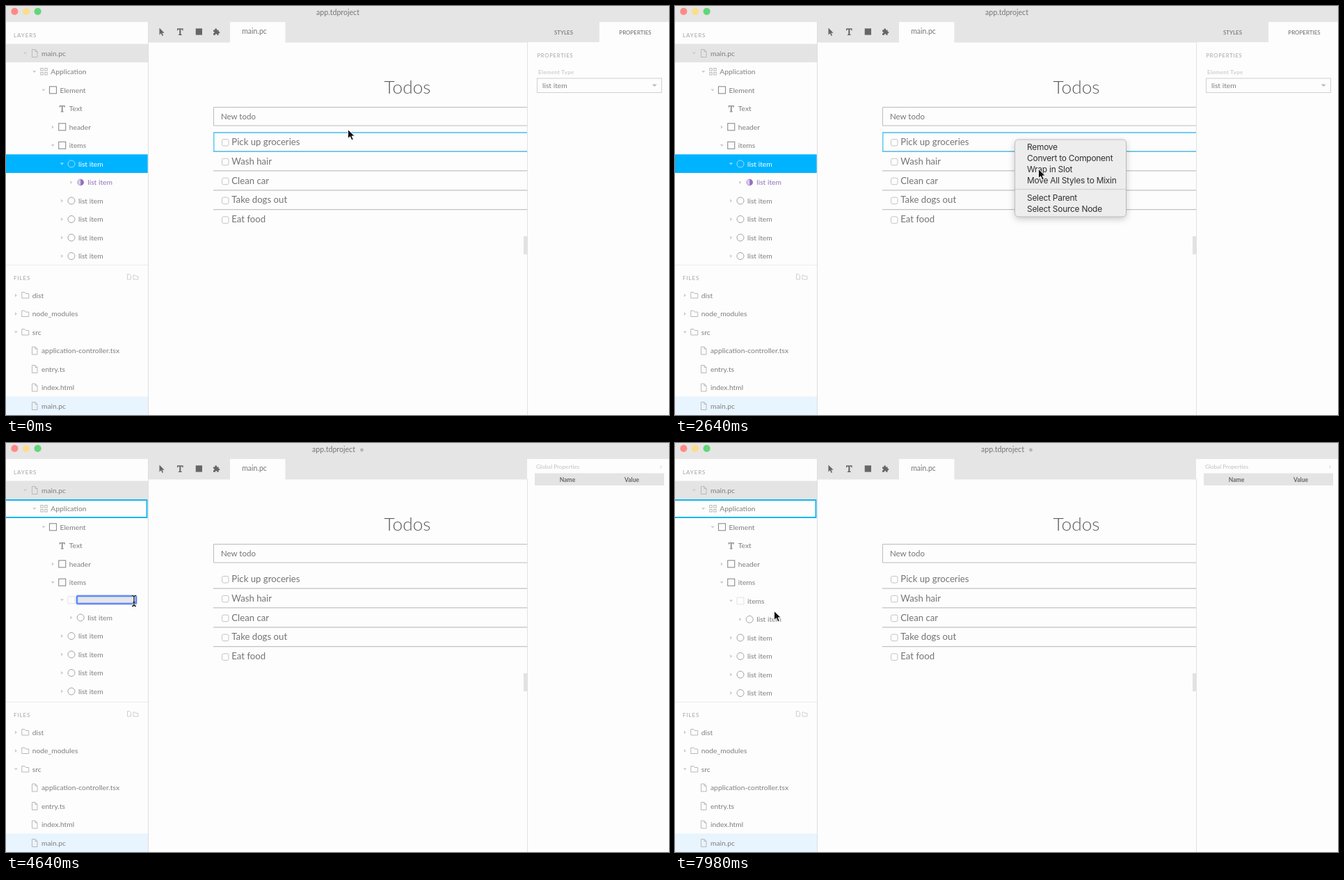
Write an HTML page that moves like this. It is 953 by 588 pixels and loops after 8000 ms.

```html
<!DOCTYPE html>
<html lang="en">
<head>
<meta charset="utf-8">
<title>app.tdproject</title>
<style>
html, body { margin: 0; height: 100%; overflow: hidden; background: #fdfdfd; }
svg { display: block; width: 953px; height: 588px; font-family: Lato, sans-serif; }
.sys { font-family: Inter, sans-serif; letter-spacing: -.22px; }
</style>
</head>
<body>
<svg id="app" viewBox="0 0 953 588"></svg>
<script>
const BLUE = '#00b3ff', TEXT = '#7f7f7f', ICON = '#a4a4a4', PALE = '#cdcdcd', PURPLE = '#9270bd';
const LOOP = 8000;

// [time, x, y]: pointer tip, held until the next entry
const pointer = [
  [0, 491, 177], [720, 487, 190], [900, 485, 194], [1610, 504, 206], [1730, 522, 219],
  [1840, 524, 234], [2080, 524, 235], [2640, 522, 234], [2760, 480, 226], [2880, 380, 217],
  [3000, 291, 211], [3390, 175, 223], [3540, 145, 225], [3660, 126, 227], [3780, 119, 227],
  [4130, 121, 227], [4280, 158, 227], [4400, 184, 227], [7620, 184, 226], [7860, 160, 236], [7980, 142, 241]
];
// [time, highlighted item, opacity]
const menuSteps = [[0, -1, 0], [1370, -1, 1], [1730, 0, 1], [1840, 2, 1], [2640, -1, 1], [2760, 2, .5], [2880, -1, 0]];
const tipSteps = [[0, 0], [5960, .5], [6070, 1], [7030, .6], [7150, .2], [7270, 0]];
const caretSteps = [[0, 0], [4130, 1], [4640, 0], [5120, 1], [5600, 0], [6070, 1], [6670, 0], [7150, 1]];
const typedSteps = [[0, ''], [7030, 'i'], [7150, 'it'], [7270, 'ite'], [7390, 'items']];

const at = (steps, t) => steps.findLast(s => s[0] <= t);
const rect = (x, y, w, h, fill, more = '') => `<rect x="${x}" y="${y}" width="${w}" height="${h}" fill="${fill}" ${more}/>`;
const box = (x, y, w, h, stroke, more = '') => rect(x, y, w, h, 'none', `stroke="${stroke}" ${more}`);
const circle = (x, y, r, more) => `<circle cx="${x}" cy="${y}" r="${r}" ${more}/>`;
const path = (d, fill, more = '') => `<path d="${d}" fill="${fill}" ${more}/>`;
const line = (d, stroke, more = '') => path(d, 'none', `stroke="${stroke}" ${more}`);
const text = (x, y, s, size, fill = TEXT, more = '') =>
  `<text x="${x}" y="${y}" font-size="${size}" fill="${fill}" ${more}>${s}</text>`;
const middle = 'text-anchor="middle"';

const icons = {
  file: (x, y) => line(`M${x - 3.5} ${y - 5.5}h4.5l3 3v8h-7.5zM${x + 1} ${y - 5.5}v3h3`, '#b8b8b8'),
  folder: (x, y) => line(`M${x - 5} ${y - 4.5}h4l1.5 2h4.5v6.5h-10z`, '#b8b8b8'),
  grid: (x, y) => [-5, 1].map(a => [-5, 1].map(b => box(x + a + .5, y + b, 3.5, 3.5, '#bbb')).join('')).join(''),
  square: (x, y) => box(x - 5, y - 5.2, 10, 10, '#8c8c8c', 'stroke-width="1.1"'),
  slot: (x, y) => box(x - 5, y - 5, 10, 10, '#d6d6d6', 'stroke-dasharray="1.5 .7"'),
  letter: (x, y) => path(`M${x - 4} ${y - 4.5}h8v2.7h-1l-.6-1.4h-1.5v7l1.2.3v.9h-4.2v-.9l1.2-.3v-7h-1.5l-.6 1.4h-1z`, '#909090'),
  circle: (x, y, c) => circle(x, y, 5, `fill="none" stroke="${c}"`),
  half: (x, y) => circle(x, y, 4.4, `fill="#ddd0ec" stroke="${PURPLE}" stroke-width=".7"`) + path(`M${x} ${y - 4.4}a4.4 4.4 0 0 1 0 8.8z`, PURPLE)
};

function fold(x, y, open, color) {
  return path(open ? `M${x - 2.6} ${y - 1.4}h5.2l-2.6 3z` : `M${x - 1.3} ${y - 2.6}v5.2l3 -2.6z`, color);
}

// fold state: 1 open, 0 closed, -1 none
function row(depth, y, icon, label, open, color = TEXT, mark = ICON) {
  const x = 51 + depth * 13.25;
  return (open < 0 ? '' : fold(x - 23.5, y, open, mark === ICON ? PALE : mark)) +
    icons[icon](x - 10, y, mark) + text(x, y + 3.7, label, 10.3, color);
}

const rowY = i => 68 + i * 26.5;
const item = (y, depth = 4) => row(depth, y, 'circle', 'list item', 0);

function chrome(t) {
  const dirty = t >= 3150, global = t >= 4010;
  let s = rect(0, 0, 953, 23, '#e5e5e5') + rect(204, 23, 749, 29.5, '#e5e5e5') + rect(322, 23, 79.5, 30, '#fdfdfd');
  ['#ff8a85', '#fbdd8c', '#62d679'].forEach((c, i) => s += circle(12.4 + i * 16.6, 7.8, 5.1, `fill="${c}"`));
  s += text(dirty ? 471 : 477, 13, 'app.tdproject', 10.6, '#777', middle);
  if (dirty) s += circle(511.5, 10, 2.4, 'fill="#b5b5b5"');
  s += path('M220.5 31.5v10l2.4-2.2 1.7 3.7 1.5-.7-1.7-3.6h3.3z', '#666');
  s += path('M246 32.3h8.6v3h-1l-.6-1.6h-1.7v6.9l1.4.3v1h-4.8v-1l1.4-.3v-6.9h-1.7l-.6 1.6h-1z', '#666');
  s += rect(272.7, 32.3, 9.3, 9.3, '#666');
  s += path('M298 34.5h2.4c-1-2.9 3.6-2.9 2.6 0h2.6v2.4c2.4-.8 2.4 3 0 2.3v2.6h-2.4c.6-2.3-2.8-2.3-2.2 0h-3v-2.6c2.2.6 2.2-2.9 0-2.3z', '#666');
  s += text(357, 40, 'main.pc', 10.5, '#777', middle);

  s += rect(749, 52, 204, 536, '#fdfdfd');
  if (global) {
    s += rect(749, 23, 204, 40, '#fdfdfd') + text(762, 37.2, 'Global Properties', 8.2, '#c0c0c0');
    s += line('M940.5 32.5l2 2 -2 2', '#ccc') + rect(760, 43.5, 186, 17.5, '#e4e4e4');
    s += text(807, 55.6, 'Name', 8.5, '#666', middle + ' font-weight="bold"') +
      text(899.5, 55.6, 'Value', 8.5, '#666', middle + ' font-weight="bold"');
  } else {
    s += rect(853, 23, 100, 30, '#fdfdfd');
    s += text(801.5, 40.7, 'STYLES', 8, '#666', middle) + text(904.5, 40.7, 'PROPERTIES', 8, '#666', middle);
  }
  if (!dirty) {
    s += text(763.5, 73.8, 'PROPERTIES', 7.6, ICON, 'letter-spacing=".8"');
    s += text(765, 98, 'Element Type', 8.1, '#c0c0c0', 'letter-spacing=".3"');
    s += box(763.5, 104, 179, 20.5, '#d0d0d0') + text(771, 117.8, 'list item', 10.3);
    s += path('M928.7 112.5h7l-3.5 3.6z', '#bbb');
  }
  return s + line('M749.5 52V588', '#e1e1e1') + rect(744, 331, 5.5, 26, '#e2e2e2');
}

function stage(t) {
  let s = text(577, 126, 'Todos', 26.3, '#5c5c5c', middle + ' font-weight="300"');
  s += line('M749 145.5H298.5V172H749', '#bcbcbc') + text(309, 163.2, 'New todo', 11.5, '#747474');
  ['Pick up groceries', 'Wash hair', 'Clean car', 'Take dogs out', 'Eat food'].forEach((label, i) => {
    const y = 195.5 + i * 27.85;
    s += box(310.5, y - 4, 9.5, 9.5, '#c4c4c4', 'rx="2.2"') + text(324.3, y + 4.3, label, 13.2, '#747474');
    if (i < 4) s += line(`M298 ${y + 13.6}H749`, '#c2c2c2', 'stroke-width="1.3"');
  });
  return s + (t < 4010 ? line('M749 182H298.8V209.2H749', '#45bfee', 'stroke-width="1.3"') : '');
}

function layers(t) {
  const wrapped = t >= 3150, open = t >= 4010, editing = t >= 4130 && t < 7620;
  let s = rect(0, 23, 204, 349, '#fdfdfd') + rect(0, 54.5, 204, 26.5, '#e4e4e4');
  s += text(11, 45.3, 'LAYERS', 8, ICON, 'letter-spacing=".9"');
  s += row(0, 68, 'file', 'main.pc', 1) + row(1, rowY(1), 'grid', 'Application', 1) + row(2, rowY(2), 'square', 'Element', 1);
  s += row(3, rowY(3), 'letter', 'Text', -1) + row(3, rowY(4), 'square', 'header', 0) + row(3, rowY(5), 'square', 'items', 1);
  if (wrapped) s += box(-1, 82, 203.5, 25, '#16b5f3', 'stroke-width="2"');

  if (!wrapped) {
    s += rect(0, 213.3, 203.7, 26.7, BLUE) + row(4, rowY(6), 'circle', 'list item', 1, '#fff', '#9fdfff');
    s += row(5, rowY(7), 'half', 'list item', 0, PURPLE);
    for (let i = 8; i < 12; i++) s += item(rowY(i));
  } else if (!open) {
    s += row(4, rowY(6), 'slot', 'Layer', 0);
    for (let i = 7; i < 11; i++) s += item(rowY(i));
    s += row(3, rowY(11), 'square', 'footer', 0);
  } else {
    const lift = editing ? 2.5 : 0;
    s += row(4, rowY(6) - lift / 2, 'slot', editing ? '' : t < 4130 ? 'Layer' : 'items', 1);
    s += item(rowY(7) - lift, 5);
    for (let i = 8; i < 12; i++) s += item(rowY(i) - lift);
    if (editing) s += field(t);
  }
  return s;
}

function field(t) {
  const typed = at(typedSteps, t)[1];
  return rect(102, 220, 85, 11, '#e6e6ea', 'stroke="#a9c0fb" stroke-width="3.4" rx="1.5"') +
    box(102, 220, 85, 11, '#4f7df0', 'stroke-width="1.6" rx="1"') +
    text(103.5, 229, typed, 10, '#555') +
    (at(caretSteps, t)[1] ? rect(103 + [0, 2.4, 6, 11.4, 0, 24][typed.length], 220.5, 1, 10.5, '#444') : '');
}

function files() {
  let s = rect(0, 372, 204, 216, '#fdfdfd') + line('M0 372.5H204', '#ebebeb') + rect(0, 561.5, 204, 27, '#e8f4fe');
  s += text(11, 393.8, 'FILES', 8, ICON, 'letter-spacing=".9"');
  s += line('M174.5 385.5h3l2 2v5.5h-5zM183 387h2.5l1 1.5h3.5v4.5h-7z', '#cfcfcf');
  const names = ['dist', 'node_modules', 'src', 'application-controller.tsx', 'entry.ts', 'index.html', 'main.pc'];
  names.forEach((name, i) => {
    const dir = i < 3;
    s += row(dir ? -1 : 0, 416 + i * 26.5, dir ? 'folder' : 'file', name, dir ? +(i === 2) : -1);
  });
  return s + line('M204.5 23V588', '#dedede');
}

function menu(t) {
  const [, active, opacity] = at(menuSteps, t);
  if (!opacity) return '';
  let s = rect(488.5, 192, 160, 111, '#ededed', 'rx="5" stroke="#bcbcbc" style="filter:drop-shadow(0 3px 5px #0003)"');
  const labels = ['Remove', 'Convert to Component', 'Wrap in Slot', 'Move All Styles to Mixin', 'Select Parent', 'Select Source Node'];
  labels.forEach((label, i) => {
    const y = 203 + i * 15.75 + (i > 3 ? 10 : 0);
    if (i === active) s += rect(489, y - 8, 159, 15.8, '#5090f6');
    s += text(506, y + 4.3, label, 11.9, i === active ? '#fff' : '#303030', 'class="sys"');
  });
  return `<g opacity="${opacity}">${s}${line('M489 263.5H648', '#d4d4d4', 'stroke-width="1.5"')}</g>`;
}

function tooltip(t) {
  const opacity = at(tipSteps, t)[1];
  return opacity ? `<g opacity="${opacity}">` +
    rect(184, 241.5, 69, 16, '#f1f1f1', 'stroke="#c9c9c9" style="filter:drop-shadow(0 1px 2px #0004)"') +
    text(189.5, 253.3, 'app.tdproject', 9.4, '#333', 'class="sys" font-weight="500"') + '</g>' : '';
}

function cursor(t) {
  const [, x, y] = at(pointer, t);
  const beam = t >= 4130 && t < 7620;
  const shape = beam
    ? ['#fff', '#111'].map((c, i) => line('M-3-7.5q3 0 3 2v11q0 2-3 2M3-7.5q-3 0-3 2M0 5.5q0 2 3 2M-1.5 2h3', c, `stroke-width="${i ? 1.3 : 2.6}"`)).join('')
    : path('M.5.5v13.2l3.1-2.9 2.3 5.1 2.4-1.1-2.2-4.8h4.2z', '#111', 'stroke="#fff" stroke-width=".9"');
  return `<g transform="translate(${x} ${y})">${shape}</g>`;
}

const app = document.getElementById('app');
let shown = '';
function draw(now) {
  const t = now % LOOP;
  const view = stage(t) + chrome(t) + layers(t) + files() + menu(t) + tooltip(t) + cursor(t);
  if (view !== shown) app.innerHTML = shown = view;
  requestAnimationFrame(draw);
}
draw(0);
</script>
</body>
</html>
```
